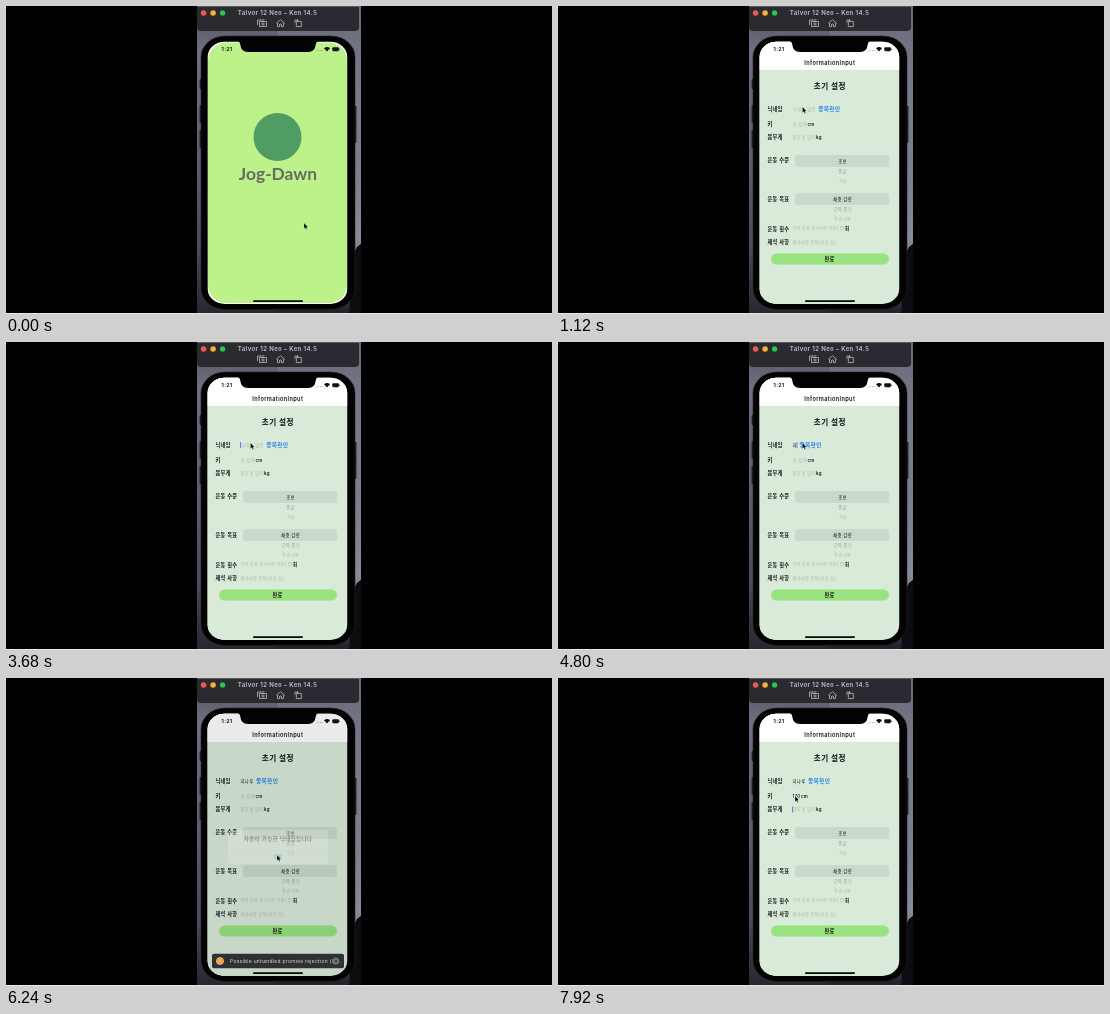
An HTML page for the animation above (8000 ms loop, 546 px wide and 308 px high).

```html
<!DOCTYPE html>
<html lang="ko">
<head>
<meta charset="utf-8">
<title>Sign-up form demo</title>
<style>
html, body { margin: 0; width: 100%; height: 100%; overflow: hidden; background: #000; }
svg { display: block; width: 100vw; height: 100vh; }
text { font-family: Inter, "Noto Sans CJK KR", "Noto Sans CJK JP", sans-serif; letter-spacing: .065em; white-space: pre; }
.brand { font-family: Lato, sans-serif; letter-spacing: 0; }
</style>
</head>
<body>
<svg id="stage" viewBox="0 0 546 308"></svg>
<script>
const STEP = 80, LOOP = 8000;
const INK = '#111613', HINT = '#a9b8aa', BLUE = '#2080ea';

// Text centred vertically on y
const text = (x, y, size, body, o = {}) =>
  `<text x="${x}" y="${(y + size * .35).toFixed(2)}" font-size="${size}" font-weight="${o.w || 500}"
    fill="${o.fill || INK}" text-anchor="${o.mid ? 'middle' : 'start'}" class="${o.cls || ''}">${body}</text>`;
const box = (x, y, w, h, r, fill, more = '') =>
  `<rect x="${x}" y="${y}" width="${w}" height="${h}" rx="${r}" fill="${fill}" ${more}/>`;
const dot = (x, y, r, fill) => `<circle cx="${x}" cy="${y}" r="${r}" fill="${fill}"/>`;
const span = (id, body, fill, more = '') => `<tspan id="${id}" fill="${fill}" ${more}>${body}</tspan>`;

const label = (y, s) => text(209.4, y, 5.2, s, { w: 700 });
const field = (y, id, hint, unit) =>
  text(234.5, y, 4.4, span(id, hint, HINT) +
    `<tspan dx=".5" font-weight="600">${unit}</tspan>`);
const picker = (y, items) =>
  box(237, y - 6, 94, 12, 2.5, '#cad9cb') +
  text(284.5, y, 4.4, items[0], { mid: 1 }) +
  text(284.5, y + 11, 4.2, items[1], { mid: 1, fill: '#8f9d90' }) +
  text(284.5, y + 20.5, 4, items[2], { mid: 1, fill: '#a9b7aa' });

const desktop = box(191, 0, 80, 308, 0, 'url(#wallLeft)') +
  box(271, 0, 84, 308, 0, 'url(#wallRight)') +
  `<path d="M348 247L351 241L355 238V308H343Z" fill="#0c0d11"/>`;

const windowBar =
  `<path d="M191 0H353V21Q353 25 349 25H195Q191 25 191 21Z" fill="#2a2a30"/>` +
  box(191, 0, 162, .6, 0, '#77777d') +
  dot(197.6, 7, 2.7, '#f4574f') + dot(207.1, 7, 2.7, '#f3b52f') + dot(216.6, 7, 2.7, '#30c148') +
  text(271.5, 7, 6, 'Talvor 12 Neo – Ken 14.5', { mid: 1, w: 700, fill: '#b4b4b9' }) +
  `<g fill="none" stroke="#b9b9be" stroke-width=".8">
    <path d="M251.5 19V14H258.5M253.5 15.5H260.5V20.5H253.5Z"/><circle cx="257" cy="18" r="1.2"/>
    <path d="M270.3 17.4L274.5 13.6L278.7 17.4M271.5 16.8V20.6H273.6V18H275.4V20.6H277.5V16.8"/>
    <path d="M290.3 15.6H295.3V20.6H290.3ZM288.8 17V14.3H292M291 13L292.3 14.3L291 15.6"/>
  </g>`;

const phone =
  [[73, 10], [99, 18], [124, 18]].map(([y, h]) => box(193.6, y, 2, h, .8, '#17171b')).join('') +
  box(348, 100, 2.4, 37, .8, '#17171b') +
  box(195, 30, 154, 273.4, 24, '#020203', 'ry="21" stroke="#26272c" stroke-width=".6"');

const splash = box(201, 35, 141, 264, 0, '#fff') +
  box(202, 36.6, 139, 260.4, 18, '#bdf28b') +
  dot(271.5, 131, 24, '#4f9d62') +
  text(272, 167.5, 17.4, 'Jog-Dawn', { mid: 1, w: 700, fill: '#666b62', cls: 'brand' });

const form = box(201, 35, 141, 264, 0, '#d9ead9') +
  box(201, 35, 141, 29, 0, '#fff') +
  text(271.8, 57, 5.6, 'InformationInput', { mid: 1, w: 600 }) +
  text(271.8, 80.5, 7.6, '초기 설정', { mid: 1, w: 700 }) +
  label(103, '닉네임') + label(118.5, '키') + label(131.5, '몸무게') +
  label(154.5, '운동 수준') + label(193, '운동 목표') +
  label(222.8, '운동 횟수') + label(236.5, '제약 사항') +
  text(234.5, 103, 4.4, span('nick', '', HINT) +
    span('check', '중복확인', BLUE, 'dx="2.6" font-size="5.7" font-weight="600"')) +
  field(118.5, 'tall', '키 입력', 'cm') +
  field(131.5, 'mass', '몸무게 입력', 'kg') +
  picker(155, ['초보', '중급', '고급']) +
  `<g clip-path="url(#wheel)">${picker(193, ['체중 감량', '근력 증가', '자세 교정'])}</g>` +
  text(234.5, 222.8, 4.1, '희망 운동 횟수(1주 기준) 입력', { fill: HINT }) +
  text(287, 222.8, 4.4, '회', { w: 700 }) +
  text(234.5, 236.5, 4.2, '제약사항 입력(부상 등)', { fill: HINT }) +
  box(213, 247.6, 118, 11, 5.5, '#98e280') +
  text(271.5, 253, 5.2, '완료', { mid: 1, w: 700 }) +
  box(234.2, 0, .8, 6, 0, '#3d6fe0', 'id="caret"');

const alertBox = box(222, 152, 100, 34, 4, '#e9eeea', 'fill-opacity=".95"') +
  text(272, 161.3, 5.5, '사용이 가능한 닉네임입니다', { mid: 1, w: 600 }) +
  box(222, 172, 100, .5, 0, '#c3cbc4') +
  text(272, 179, 5.7, 'OK', { mid: 1, w: 600, fill: '#2580ea' });

const toast = box(206, 275.8, 132, 14.4, 2, '#303134') +
  dot(214, 283, 3.8, '#f4d9b4') + dot(214, 283, 3.2, '#ef9a3a') +
  text(214, 283, 4.6, '!', { mid: 1, w: 700, fill: '#fff' }) +
  text(224, 283, 4.9, 'Possible unhandled promise rejection (id...', { w: 400, fill: '#e2e2e4' }) +
  dot(329.8, 283, 3.5, '#717276') +
  `<path d="M328.6 281.8L331 284.2M331 281.8L328.6 284.2" stroke="#2b2c2f" stroke-width=".7"/>`;

const status = text(221, 43.3, 5.2, '1:21', { mid: 1, w: 700 }) +
  [311, 312.7, 314.4, 316.1].map(x => dot(x, 44.4, .45, '#4c544d')).join('') +
  `<path d="M318 42.3Q321 39.6 324 42.3L321 45.6Z" fill="#111"/>` +
  box(326.3, 41.2, 6.6, 4, 1.1, '#111') + box(333.3, 42.4, .7, 1.6, .3, '#333') +
  `<path d="M232 35H312Q310 36 309.6 39Q309 46 302 46H242Q235 46 234.4 39Q234 36 232 35Z" fill="#020203"/>` +
  box(247, 294.2, 50, 1.7, .85, '#050805');

const stage = document.getElementById('stage');
stage.innerHTML = `<defs>
  <linearGradient id="wallLeft" x2="0" y2="1">
    <stop offset="0" stop-color="#50525f"/><stop offset=".15" stop-color="#6e7080"/>
    <stop offset=".5" stop-color="#5c5e6c"/><stop offset=".78" stop-color="#4a4c59"/>
    <stop offset="1" stop-color="#25262e"/>
  </linearGradient>
  <linearGradient id="wallRight" x2="0" y2="1">
    <stop offset="0" stop-color="#686a79"/><stop offset=".2" stop-color="#767888"/>
    <stop offset=".55" stop-color="#7c7e8e"/><stop offset=".76" stop-color="#888a99"/>
    <stop offset="1" stop-color="#1d1e26"/>
  </linearGradient>
  <clipPath id="glass">${box(201.7, 35.8, 139.5, 262.2, 17, '#000', 'ry="15"')}</clipPath>
  <clipPath id="wheel">${box(237, 180, 94, 35, 0, '#000')}</clipPath>
</defs>
${desktop}${windowBar}${phone}
<g clip-path="url(#glass)">
  <g id="splash">${splash}</g><g id="form">${form}</g>
  <g id="dim">${box(201, 35, 141, 264, 0, '#000')}</g>
  <g id="alert">${alertBox}</g><g id="toast">${toast}</g>
</g>
${status}
${box(0, 307, 546, 1, 0, '#e6e6e6')}
<path id="mouse" d="M0 0V5.8L1.3 4.6L2.2 6.6L3.1 6.2L2.3 4.3H4.1Z" fill="#050505" stroke="#fff"
  stroke-opacity=".6" stroke-width=".4"/>`;

const $ = id => document.getElementById(id);
const clamp = v => Math.max(0, Math.min(1, v));
const ramp = (t, a, b) => clamp((t - a) / (b - a));
const ease = p => p * p * (3 - 2 * p);

// time, x, y of the pointer tip
const path = [
  [0, 298, 217], [720, 298, 217], [1080, 244.5, 101], [5200, 244.5, 101],
  [5400, 256, 104], [5600, 256, 110], [5920, 256, 110], [6100, 271, 177], [6320, 271, 177],
  [6640, 329, 281], [6800, 329, 281], [7120, 237, 118], [8000, 237, 118]
];
const nickSteps = [[0, ''], [4480, 'ㅈ'], [4640, '지'], [4880, '진'], [4960, '지나'], [5040, '지날'], [5120, '지나루']];
const tallSteps = [[0, ''], [7360, '1'], [7520, '17'], [7600, '170']];
const focusSteps = [[0, ''], [1280, 'nick'], [5440, ''], [7200, 'tall'], [7760, 'mass']];
const rowY = { nick: 103, tall: 118.5, mass: 131.5 };

const latest = (steps, t) => steps.filter(s => s[0] <= t).pop();

function pointer(t) {
  const i = path.findIndex(k => k[0] > t);
  const [a, b] = [path[i - 1], path[i]];
  const p = ease(ramp(t, a[0], b[0]));
  return [a[1] + (b[1] - a[1]) * p, a[2] + (b[2] - a[2]) * p];
}

function fill(id, value, hint) {
  const el = $(id);
  el.textContent = value || hint;
  el.setAttribute('fill', value ? INK : HINT);
}

function draw(t) {
  const slide = 1 - Math.pow(1 - ramp(t, 400, 800), 3);
  $('form').setAttribute('transform', `translate(${141 * (1 - slide)} 0)`);
  $('splash').setAttribute('transform', `translate(${-42 * slide} 0)`);

  const values = { nick: latest(nickSteps, t)[1], tall: latest(tallSteps, t)[1], mass: '' };
  fill('nick', values.nick, '닉네임 입력');
  fill('tall', values.tall, '키 입력');

  const [since, focus] = latest(focusSteps, t);
  const caret = $('caret');
  caret.setAttribute('opacity', focus && (t - since) % 1000 < 560 ? 1 : 0);
  if (focus) {
    const end = values[focus] ? $(focus).getComputedTextLength() : 0;
    caret.setAttribute('x', 234.2 + end);
    caret.setAttribute('y', rowY[focus] - 3);
  }

  const shown = ramp(t, 5560, 5760), gone = ramp(t, 6130, 6310);
  const pop = 1 + .15 * (1 - ease(shown));
  $('dim').setAttribute('opacity', .2 * shown * (1 - gone));
  $('alert').setAttribute('opacity', shown * Math.pow(1 - gone, 1.3));
  $('alert').setAttribute('transform', `translate(272 169) scale(${pop}) translate(-272 -169)`);
  $('toast').style.display = t >= 5680 && t < 6800 ? '' : 'none';

  $('mouse').setAttribute('transform', `translate(${pointer(t)})`);
}

const start = performance.now();
function tick() {
  const t = (performance.now() - start) % LOOP;
  draw(Math.floor(t / STEP) * STEP);
  requestAnimationFrame(tick);
}
tick();
</script>
</body>
</html>
```
